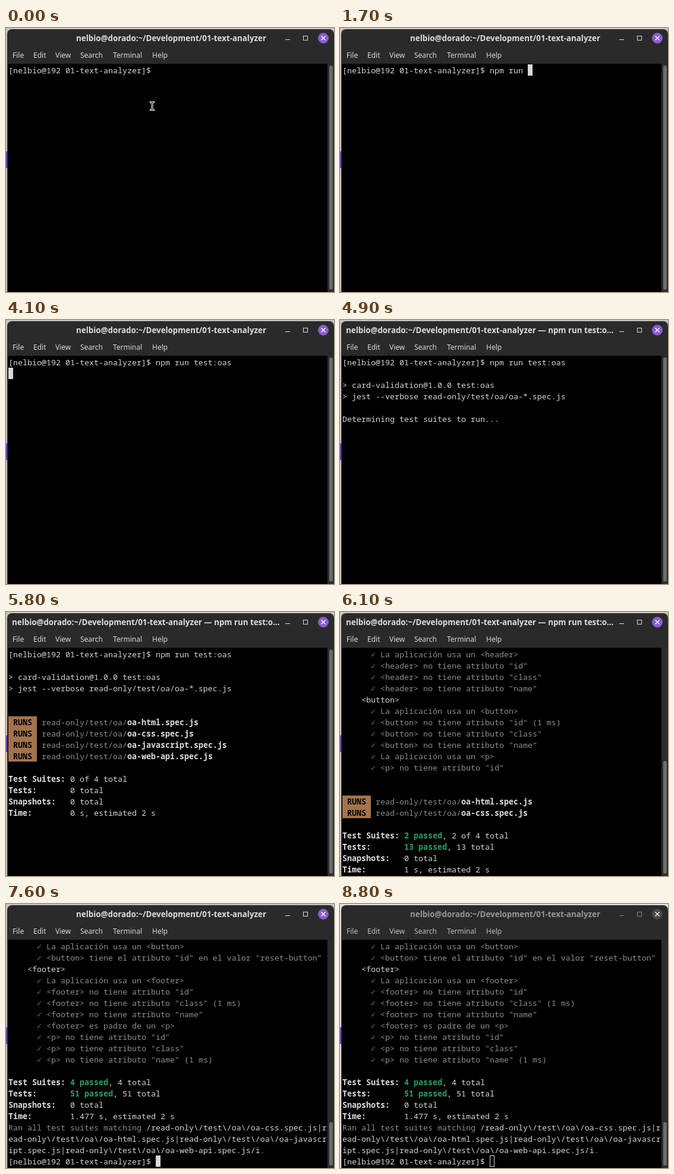
Recreate the animation shown at these times as an HTML page. Size 552 by 443 pixels, loop 8.9 s.

```html
<!DOCTYPE html>
<html lang="es">
<head>
<meta charset="utf-8">
<title>Terminal</title>
<style>
  html, body { margin: 0; width: 100%; height: 100%; overflow: hidden; }
  #stage {
    --blur: 0;
    position: relative; width: 552px; height: 443px; overflow: hidden;
    background: color-mix(in srgb, #dedede calc(var(--blur) * 100%), #c4c4c4);
  }
  #stage * { box-sizing: border-box; }
  #accent { position: absolute; left: 0; top: 207px; width: 2px; height: 28px; background: #6b43ad; }
  #window {
    position: absolute; left: 2px; top: 2px; width: 550px; height: 441px;
    background: linear-gradient(#2a2a2a 58px, #2c2c2c 58px); border-radius: 8px 8px 0 0;
  }
  #title, .menu, #screen, #thumb, #chrome, #pointer { position: absolute; }
  #title {
    top: 7px; width: 556px; height: 20px; text-align: center; white-space: pre;
    font: bold 13.333px/20px "Noto Sans", sans-serif;
    color: color-mix(in srgb, #979797 calc(var(--blur) * 100%), #dedede);
  }
  #title.long { left: 10px; text-align: left; }
  .menu {
    top: 36px; font: 12px/19px "Noto Sans", sans-serif;
    color: color-mix(in srgb, #bdbdbd calc(var(--blur) * 100%), #dadada);
  }
  #chrome { left: 0; top: 0; }
  #chrome .dim { opacity: calc(1 - var(--blur) * .5); }
  #close { fill: color-mix(in srgb, #484848 calc(var(--blur) * 100%), #8a5bd3); }
  #screen {
    left: 3px; top: 60px; width: 538px; height: 383px; background: #000; color: #d6d5d2;
    padding: 1px 0 0 1px; overflow: hidden;
    font: 13.333px/21px "Noto Sans Mono", "DejaVu Sans Mono", monospace;
    font-variant-ligatures: none;
  }
  .row { height: 19px; white-space: pre; }
  .row b { color: #dedddb; }
  .row i { font-style: normal; color: #8e8d8b; }
  .row .tick { display: inline-block; width: 8px; height: 19px; vertical-align: top; color: #239661; }
  .row .pass { color: #26a269; }
  .row .runs { display: inline-block; height: 19px; vertical-align: top; background: #a2734c; color: #000; }
  #cursor { position: absolute; width: 8px; height: 19px; background: #d9d8d5; }
  #cursor.hollow { background: none; border: 1px solid #d9d8d5; }
  #thumb { left: 544px; width: 6px; border-radius: 3px; background: #6c6c6c; }
  #pointer { left: 240px; top: 121px; }
</style>
</head>
<body>
<div id="stage">
  <div id="accent"></div>
  <div id="window"></div>
  <div id="title"></div>
  <div class="menu" style="left:11px">File</div>
  <div class="menu" style="left:46px">Edit</div>
  <div class="menu" style="left:83px">View</div>
  <div class="menu" style="left:125px">Search</div>
  <div class="menu" style="left:180px">Terminal</div>
  <div class="menu" style="left:246px">Help</div>
  <svg id="chrome" width="552" height="60" fill="none">
    <g class="dim" stroke="#dedede">
      <path d="M470 19.5h8"/>
      <rect x="500.5" y="13.5" width="7" height="7"/>
    </g>
    <circle id="close" cx="534" cy="17" r="9"/>
    <path d="M530.5 13.5l7 7m0-7l-7 7" stroke="#fff" stroke-width="1.3"/>
  </svg>
  <div id="screen"><div id="rows"></div><div id="cursor"></div></div>
  <div id="thumb"></div>
  <svg id="pointer" width="12" height="20" fill="none" stroke-linecap="square">
    <path d="M3.5 3.5h2l.5.5.5-.5h2M6 4v12M3.5 16.5h2l.5-.5.5.5h2" stroke="#fff" stroke-width="3"/>
    <path d="M3.5 3.5h2l.5.5.5-.5h2M6 4v12M3.5 16.5h2l.5-.5.5.5h2" stroke="#000"/>
  </svg>
</div>
<script>
const LOOP = 8900;
const PROMPT = '[nelbio@192 01-text-analyzer]$ ';
const COMMAND = 'npm run test:oas';
const TITLE = 'nelbio@dorado:~/Development/01-text-analyzer';
const LONG_TITLE = TITLE + ' — npm run test:o…';
const KEY_TIMES = [400, 700, 900, 1100, 1200, 1400, 1500, 1700, 1900, 2000, 2000, 2100, 2400, 2900, 3100, 3400];

const $ = id => document.getElementById(id);
const esc = s => s.replace(/&/g, '&amp;').replace(/</g, '&lt;');
const dim = s => `<i>${esc(s)}</i>`;
const bold = s => `<b>${esc(s)}</b>`;
const passed = n => n ? `<b class="pass">${n} passed</b>, ` : '';
const check = s => `      <span class="tick">✓</span> ${dim(s)}`;
const runs = name => `<b class="runs"> RUNS </b> ${dim('read-only/test/oa/')}${bold(`oa-${name}.spec.js`)}`;
const without = (tag, timed = []) => ['id', 'class', 'name'].map(attr =>
  check(`<${tag}> no tiene atributo "${attr}"${timed.includes(attr) ? ' (1 ms)' : ''}`));

const summary = (suites, suiteTotal, tests, time) => [
  `${bold('Test Suites:')} ${passed(suites)}${suiteTotal} total`,
  `${bold('Tests:')}       ${passed(tests)}${tests} total`,
  `${bold('Snapshots:')}   0 total`,
  `${bold('Time:')}        ${time} s, estimated 2 s`
];

const SUITES = ['html', 'css', 'javascript', 'web-api'];
const typed = PROMPT + COMMAND;
const header = [typed, '', '> card-validation@1.0.0 test:oas', '> jest --verbose read-only/test/oa/oa-*.spec.js', ''];
const running = n => [...header, '', ...SUITES.slice(0, n).map(runs), '', ...summary(0, '0 of 4', 0, 0)];

const footer = [
  check('La aplicación usa un <button>'),
  check('<button> tiene el atributo "id" en el valor "reset-button"'),
  '    &lt;footer>',
  check('La aplicación usa un <footer>'),
  ...without('footer', ['class']),
  check('<footer> es padre de un <p>'),
  ...without('p', ['name'])
];
const early = [
  check('La aplicación usa un <header>'),
  ...without('header'),
  '    &lt;button>',
  check('La aplicación usa un <button>'),
  ...without('button', ['id']),
  check('La aplicación usa un <p>'),
  check('<p> no tiene atributo "id"')
];
const result = [
  ...footer, '', ...summary(4, 4, 51, '1.477'),
  dim('Ran all test suites matching ') + '/read-only\\/test\\/oa\\/oa-css.spec.js|r',
  'ead-only\\/test\\/oa\\/oa-html.spec.js|read-only\\/test\\/oa\\/oa-javascr',
  'ipt.spec.js|read-only\\/test\\/oa\\/oa-web-api.spec.js/i' + dim('.'),
  PROMPT
];
const partial = (list, suites, tests) => [
  ...list, '', '', ...SUITES.slice(0, 4 - suites).map(runs), '',
  ...summary(suites, `${suites} of 4`, tests, 1)
];

// Each scene: start time, rows, cursor [column, row] or null, scroll thumb top.
const scenes = [
  [0, [PROMPT], null, 63],
  [300, [PROMPT], [31, 0], 63],
  ...KEY_TIMES.map((time, i) => [time, [PROMPT + COMMAND.slice(0, i + 1)], [32 + i, 0], 63]),
  [4100, [typed], [0, 1], 63],
  [4400, header, [0, 5], 63],
  [4600, header, null, 63],
  [4900, [...header, 'Determining test suites to run...'], null, 63],
  [5000, running(1), [31, 11], 63],
  [5100, running(3), [31, 13], 63],
  [5200, running(4), [31, 14], 63],
  [5800, running(4), null, 63],
  [6000, partial(early.slice(0, 10), 1, 5), null, 190],
  [6100, partial(early, 2, 13), null, 250],
  [6400, partial(footer, 2, 13), null, 366],
  [6500, result, [31, 19], 366],
  [7000, result, null, 366],
  [7600, result, [31, 19], 366]
];

let shown = null;

function showScene(scene) {
  if (scene === shown) return;
  shown = scene;
  const [, rows, cursor, thumbTop] = scene;
  $('rows').innerHTML = rows.map(row => `<div class="row">${row}</div>`).join('');
  $('cursor').style.display = cursor ? 'block' : 'none';
  if (cursor) {
    $('cursor').style.left = `${1 + cursor[0] * 8}px`;
    $('cursor').style.top = `${1 + cursor[1] * 19}px`;
  }
  $('thumb').style.top = `${thumbTop}px`;
  $('thumb').style.height = `${439 - thumbTop}px`;
}

function draw(time) {
  showScene(scenes.findLast(scene => scene[0] <= time));
  const long = time >= 4200 && time < 6500;
  $('title').textContent = long ? LONG_TITLE : TITLE;
  $('title').classList.toggle('long', long);
  $('pointer').style.display = time < 300 ? 'block' : 'none';
  $('cursor').classList.toggle('hollow', time >= 8100);
  const blur = Math.max(0, Math.floor((time - 8000) / 100) / 8);
  $('stage').style.setProperty('--blur', Math.min(1, blur));
}

const start = performance.now();
function tick() {
  draw((performance.now() - start) % LOOP);
  requestAnimationFrame(tick);
}
tick();
</script>
</body>
</html>
```
